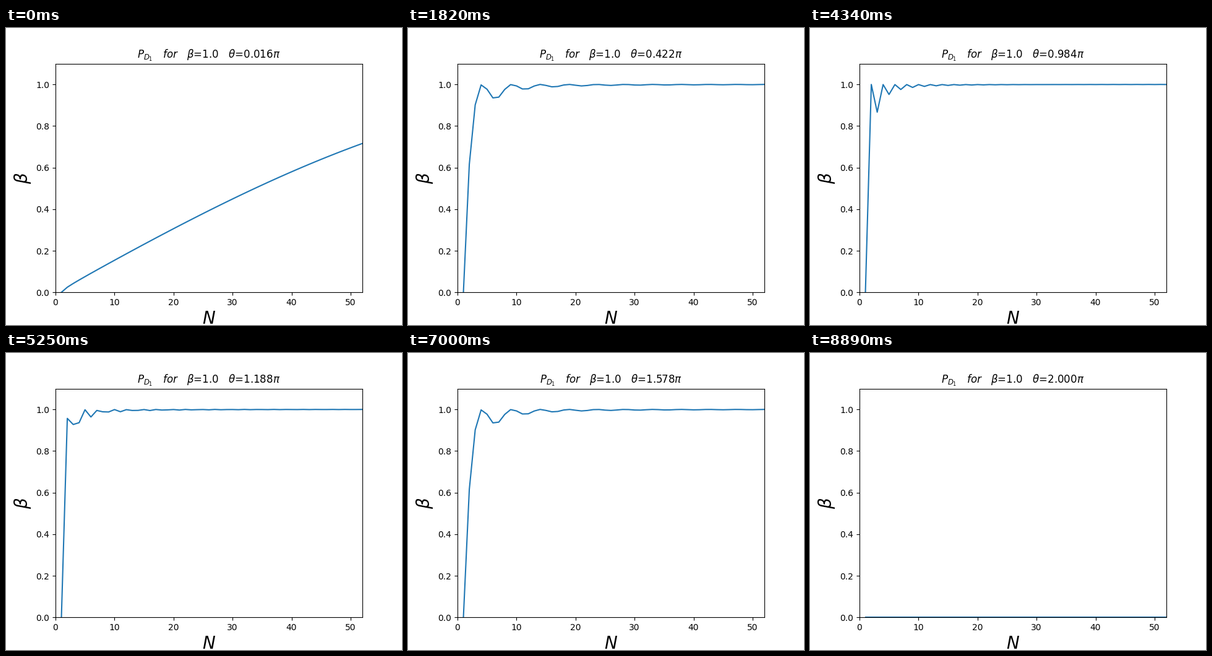
A matplotlib script that plays this animation: 640 px wide and 480 px high, repeating every 8960 ms.

```python
import numpy as np
import matplotlib.pyplot as plt
from matplotlib.animation import FuncAnimation

FRAMES = 128
BETA = 1.0
N = np.arange(1, 53)


def amplitude(theta):
    """Amplitude at D1 after N splitters of angle pi/2N and phase theta."""
    a = np.pi / (2 * N)
    half = theta / 2
    w = np.arccos(np.cos(a) * np.cos(half))
    return np.hypot(np.cos(N * w),
                    np.cos(a) * np.sin(half) * np.sin(N * w) / np.sin(w))


fig, ax = plt.subplots(figsize=(6.4, 4.8), dpi=100)
ax.set_xlim(0, 52)
ax.set_ylim(0, 1.1)
ax.set_xlabel(r"$N$", fontsize=20)
ax.set_ylabel(r"$\beta$", fontsize=20)
line, = ax.plot([], [])
title = ax.set_title("")


def update(i):
    turns = 2 * (i + 1) / FRAMES
    line.set_data(N, amplitude(turns * np.pi))
    title.set_text(r"$P_{D_1}\quad for\quad\beta$=%.1f$\quad\theta$=%.3f$\pi$"
                   % (BETA, turns))
    return line, title


anim = FuncAnimation(fig, update, frames=FRAMES, interval=70,
                     repeat=True, repeat_delay=0)
plt.show()
```
